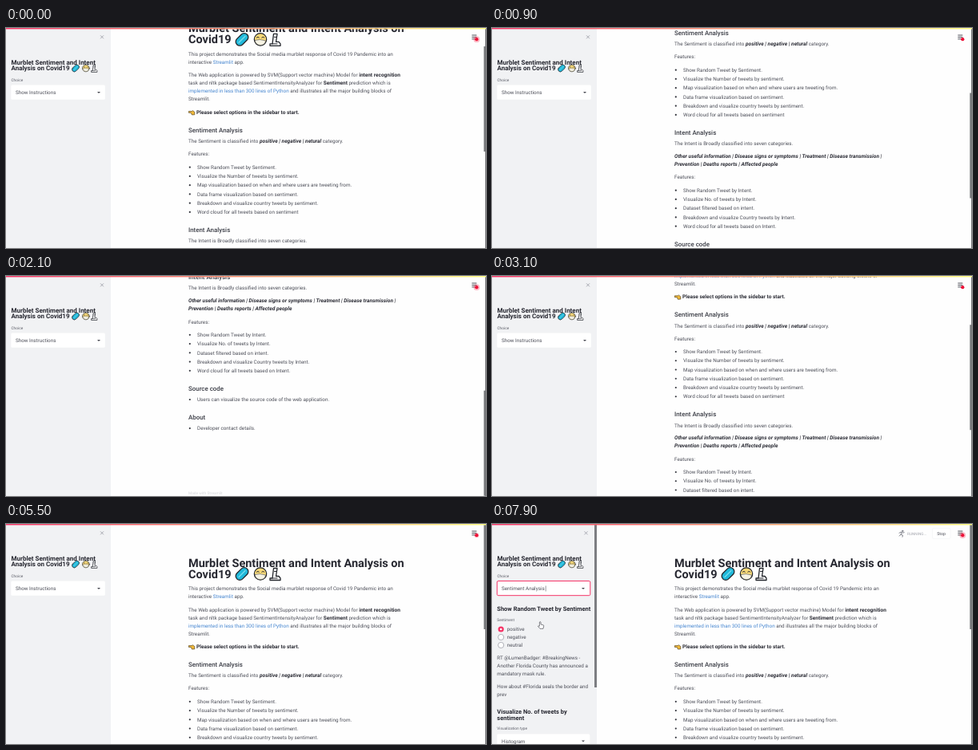
Animation, 600 px wide and 276 px high, one loop 8000 ms. Source, as an HTML page:

```html
<!DOCTYPE html>
<html lang="en">
<head>
<meta charset="utf-8">
<title>Sentiment and Intent Analysis</title>
<style>
  html, body { margin: 0; width: 100%; height: 100%; overflow: hidden; background: #fefefe; }
  svg { display: block; width: 100vw; height: 100vh; }
  text { font: 6.3px Roboto, "Open Sans", sans-serif; fill: #4d4f59; text-rendering: geometricPrecision; white-space: pre; }
  .h1 { font-size: 14.5px; font-weight: 700; fill: #262730; }
  .h3 { font-size: 7.9px; font-weight: 500; fill: #3b3d46; }
  .title { font-size: 8px; font-weight: 700; fill: #262730; }
  .sub { font-size: 7.5px; font-weight: 700; fill: #262730; }
  .label { font-size: 4.8px; fill: #5c5e68; }
  .pale { font-size: 4.8px; fill: #d5d6da; }
  .status { font-size: 4.7px; fill: #a3a5ad; }
  .b { font-size: 6.5px; font-weight: 700; fill: #2d2e37; }
  .bi { font-size: 6.6px; font-weight: 700; font-style: italic; fill: #2d2e37; }
  .a { fill: #4686d0; }
</style>
</head>
<body>
<svg viewBox="0 0 600 276" preserveAspectRatio="none">
  <defs>
    <linearGradient id="rainbow">
      <stop stop-color="#f63366"/><stop offset="1" stop-color="#fffd80"/>
    </linearGradient>
    <g id="emoji" stroke="#22252b" stroke-linejoin="round" stroke-linecap="round">
      <rect x="-9" y="-5" width="18" height="10" rx="5" fill="#20b9da" stroke-width="1.3" transform="rotate(-45)"/>
      <path d="M-4 4L4 -4" stroke="#79dcec" stroke-width="1.4"/>
      <circle cx="23" r="7.7" fill="#f8d978" stroke-width="1.2"/>
      <path d="M16 1Q22 -1 29.5 1.5Q29 7 23 7.3Q17 7 16 1Z" fill="#f6f3e4" stroke-width=".5"/>
      <path d="M18.3 -2.4q1.6 -1.6 3 0M24.8 -2.4q1.6 -1.6 3 0" fill="none" stroke-width="1"/>
      <path d="M35 8v-2.5h3l1.5 -12.5h4.5l-1.5 10h3.5l2 2.5v2.5z" fill="#fff" stroke-width="1.3"/>
      <path d="M38 5.5h6M40.5 -3h3" fill="none" stroke-width="1"/>
    </g>
    <path id="arrow" d="M-2 -.9h4l-2 2z" fill="#4a4c55"/>
  </defs>

  <rect width="600" height="276" fill="#fefefe"/>
  <g id="page"></g>
  <rect x="599.2" width=".8" height="276" fill="#55565a"/>
  <rect id="thumb" x="597.3" width="2.7" height="132" fill="#77787b"/>

  <g id="running">
    <g fill="none" stroke="#777983" stroke-width=".9" stroke-linecap="round">
      <circle cx="513.2" cy="8.8" r=".7" fill="#777983"/>
      <path d="M509 11.3l2.2 -1.3 2 1.2 2 -.7M512 10.7l-1 2.5 2.5 1 -.5 2M511 13.2l-1.8 1.8"/>
    </g>
    <text x="519" y="13.7" class="status">RUNNING...</text>
    <rect x="550.5" y="5.3" width="22.5" height="13" rx="1.5" fill="#fff" stroke="#eceef1" stroke-width=".5"/>
    <text x="561.6" y="13.6" text-anchor="middle" style="font-size:5.3px">Stop</text>
  </g>
  <path d="M582.3 9h6M582.3 11.4h6M582.3 13.8h6" stroke="#4a4c55" stroke-width="1"/>
  <circle id="glow" cx="588.3" cy="14.2" fill="#f5405e" opacity=".35"/>
  <circle cx="588.3" cy="14.2" r="2.1" fill="#ee1238"/>

  <rect width="131" height="276" fill="#f1f2f4"/>
  <path id="close" d="M-2 -2l4 4M2 -2l-4 4" stroke="#a0a2ab" stroke-width=".9"/>
  <g id="sidebar"></g>
  <rect id="box" x="6.3" y="71.5" height="18.2" rx="1.5" fill="#fff"/>
  <text id="choice" x="12" y="83"></text>
  <path id="caret" d="M67.2 77.5v7" stroke="#33353d" stroke-width=".5"/>
  <use id="boxArrow" href="#arrow" y="81"/>
  <g id="result"></g>
  <g id="histogram"></g>
  <rect id="sideThumb" x="128" width="3" height="205" fill="#7d7e82"/>
  <g id="menu"></g>
  <rect width="600" height="1.4" fill="url(#rainbow)"/>
  <path id="hand" d="M-1.6 -4q.9 -1 1.6 0v3l3 .7q.9 .3 .7 1.4l-.7 3.2h-4l-2.6 -3q.3 -1.2 2 0z" fill="#fff" stroke="#33353d" stroke-width=".6"/>
</svg>
<script>
const $ = id => document.getElementById(id);
const text = (x, y, content, cls = '') => `<text x="${x}" y="${y}" class="${cls}">${content}</text>`;
const span = (cls, content) => `<tspan class="${cls}">${content}</tspan>`;
const lines = (x, y, step, items, cls) => items.map((s, i) => text(x, y + i * step, s, cls)).join('');
const bullets = (y, items) => lines(239, y, 11.25, items) +
  items.map((_, i) => `<circle cx="229.8" cy="${y - 2.2 + i * 11.25}" r="1.1" fill="#33353d"/>`).join('');

$('page').innerHTML =
  lines(228, 53.6, 13.9, ['Murblet Sentiment and Intent Analysis on', 'Covid19'], 'h1') +
  '<use href="#emoji" x="295" y="62.5"/>' +
  lines(228, 83.3, 10, [
    'This project demonstrates the Social media murblet response of Covid 19 Pandemic into an',
    `interactive ${span('a', 'Streamlit')} app.`]) +
  lines(228, 109.5, 10, [
    `The Web application is powered by SVM(Support vector machine) Model for ${span('b', 'intent recognition')}`,
    `task and nltk package based SentimentIntensityAnalyzer for ${span('b', 'Sentiment')} prediction which is`,
    `${span('a', 'implemented in less than 300 lines of Python')} and illustrates all the major building blocks of`,
    'Streamlit.']) +
  '<path d="M228.4 152.6h4l1 -.9 2.4 2v3.2l-3.4 .2 -1.2 -2.6h-2.8z" fill="#f0b93a" stroke="#3f3218" stroke-width=".6"/>' +
  text(238, 156.3, 'Please select options in the sidebar to start.', 'b') +
  text(228, 179, 'Sentiment Analysis', 'h3') +
  text(228, 192.4, `The Sentiment is classified into ${span('bi', 'positive | negative | netural')} category.`) +
  text(228, 208.4, 'Features:') +
  bullets(225, [
    'Show Random Tweet by Sentiment.',
    'Visualize the Number of tweets by sentiment.',
    'Map visualization based on when and where users are tweeting from.',
    'Data frame visualization based on sentiment.',
    'Breakdown and visualize country tweets by sentiment.',
    'Word cloud for all tweets based on sentiment']) +
  text(228, 304, 'Intent Analysis', 'h3') +
  text(228, 317.4, 'The Intent is Broadly classified into seven categories.') +
  lines(228, 333.3, 10, [
    'Other useful information | Disease signs or symptoms | Treatment | Disease transmission |',
    'Prevention | Deaths reports | Affected people'], 'bi') +
  text(228, 359.6, 'Features:') +
  bullets(376, [
    'Show Random Tweet by Intent.',
    'Visualize No. of tweets by Intent.',
    'Dataset filtered based on intent.',
    'Breakdown and visualize Country tweets by Intent.',
    'Word cloud for all tweets based on Intent.']) +
  text(228, 444, 'Source code', 'h3') +
  bullets(457.2, ['Users can visualize the source code of the web application.']) +
  text(228, 480, 'About', 'h3') +
  bullets(493.3, ['Developer contact details.']) +
  text(228, 573.7, 'Made with Streamlit', 'pale');

$('sidebar').innerHTML =
  lines(6.5, 45.5, 7.8, ['Murblet Sentiment and Intent', 'Analysis on Covid19'], 'title') +
  '<use href="#emoji" transform="translate(87 50.5) scale(.56)"/>' +
  text(6.5, 66.5, 'Choice', 'label');

const radio = (label, i) => {
  const y = 132 + i * 10;
  const look = i ? 'fill="#fff" stroke="#a7a9b1" stroke-width=".9"' : 'fill="#f63366"';
  return `<circle cx="11.2" cy="${y}" r="3.6" ${look}/>` +
    (i ? '' : `<circle cx="11.2" cy="${y}" r="1.3" fill="#fff"/>`) + text(18.8, y + 2.2, label);
};
$('result').innerHTML =
  text(6.3, 109.4, 'Show Random Tweet by Sentiment', 'sub') +
  text(6.3, 122.4, 'Sentiment', 'label') +
  ['positive', 'negative', 'neutral'].map(radio).join('') +
  lines(6.3, 170.2, 10, ['RT @LumenBadger: #BreakingNews -', 'Another Florida County has announced a', 'mandatory mask rule.']) +
  lines(6.3, 206.3, 10, ['How about #Florida seals the border and', 'prev']) +
  lines(6.3, 238.3, 7.3, ['Visualize No. of tweets by', 'sentiment'], 'sub') +
  text(6.3, 257.6, 'Visualization type', 'label');

$('histogram').innerHTML =
  '<rect x="6.3" y="263.5" width="116" height="17" rx="1.5" fill="#fff"/>' +
  text(12, 274.5, 'Histogram') + '<use href="#arrow" x="114" y="272.3"/>';

$('menu').innerHTML =
  '<rect x="6.3" y="92" width="117.5" height="84" rx="1.5" fill="#fff" stroke="#dcdee4" stroke-width=".6"/>' +
  '<rect id="hover" x="6.5" width="117" height="15.6" fill="#f0f2f6"/>' +
  lines(12, 105, 15.6, ['Show Instructions', 'Sentiment Analysis', 'Intent Analysis', 'Source code', 'About']);

// Linear interpolation through [time, value] points.
function track(points, t) {
  const i = points.findIndex(p => p[0] > t);
  if (i < 0) return points[points.length - 1][1];
  if (!i) return points[0][1];
  const [t0, a] = points[i - 1], [t1, b] = points[i];
  return a + (b - a) * (t - t0) / (t1 - t0);
}
const scrollPath = [[0, 48], [900, 170], [1600, 288], [2100, 300], [2550, 300], [3100, 128], [3700, 12], [4000, 0]];
const handX = [[5850, 128], [6200, 72], [6600, 52], [7000, 52], [7500, 61]];
const handY = [[5850, 64], [6200, 82], [6600, 118], [7000, 118], [7500, 127]];

const show = (id, on) => $(id).setAttribute('visibility', on ? 'visible' : 'hidden');
const set = (id, attrs) => { for (const k in attrs) $(id).setAttribute(k, attrs[k]); };

function draw(t) {
  const scroll = track(scrollPath, t);
  set('page', { transform: `translate(0 ${-scroll})` });
  set('thumb', { y: scroll * 0.479 });
  set('glow', { r: 2.9 + Math.cos(t * Math.PI / 1000) });

  const focused = t >= 6300, chosen = t >= 6800, loaded = t >= 7300;
  const y = track(handY, t);
  show('hand', t >= 5900);
  set('hand', { transform: `translate(${track(handX, t)} ${y})` });
  show('menu', focused && !chosen);
  set('hover', { y: y > 111 ? 110.6 : 95 });
  show('running', t >= 6900);
  show('result', loaded);
  show('sideThumb', loaded);
  show('histogram', t >= 7700);
  show('caret', chosen);
  $('choice').textContent = chosen ? 'Sentiment Analysis' : 'Show Instructions';
  set('box', { width: loaded ? 116.5 : 117.5, stroke: focused ? '#f63366' : 'none' });
  set('boxArrow', { x: loaded ? 114 : 116 });
  set('close', { transform: `translate(${loaded ? 117.5 : 120} 11.3)` });
}

function frame(now) {
  draw(now % 8000);
  requestAnimationFrame(frame);
}
draw(0);
requestAnimationFrame(frame);
</script>
</body>
</html>
```
